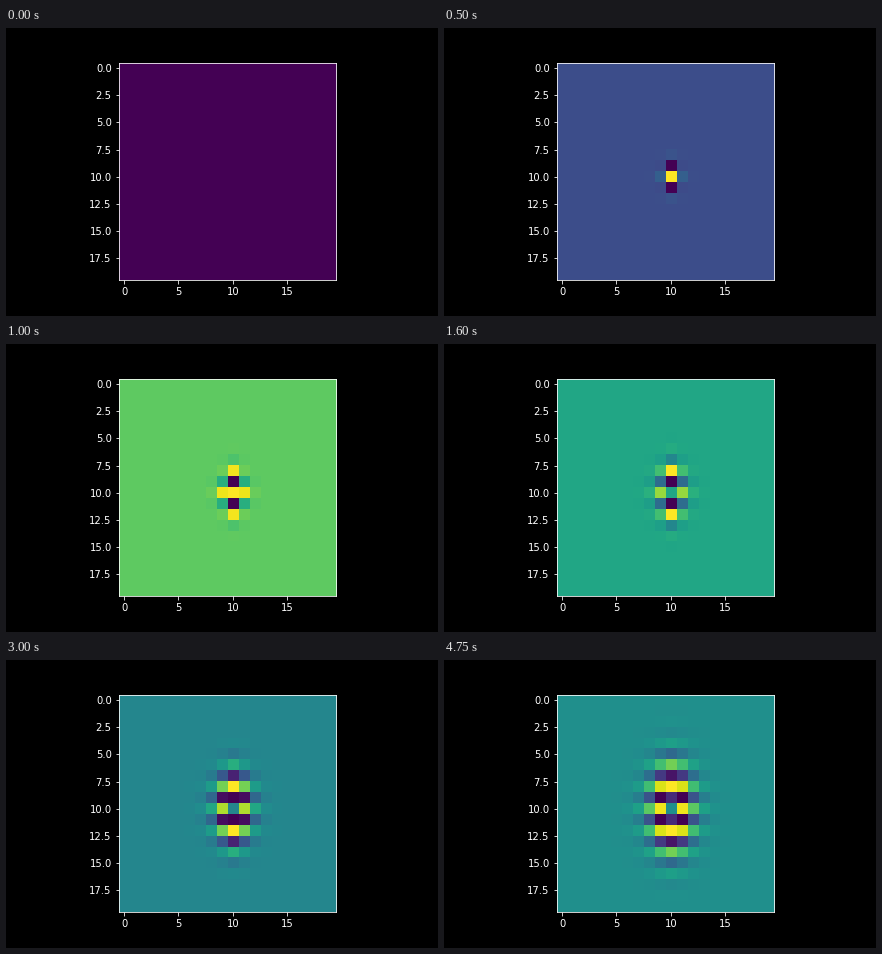
Write a matplotlib script that moves like this. It is 432 px wide and 288 px high and loops after 5000 ms.

```python
import numpy as np
import matplotlib.pyplot as plt
from matplotlib.animation import FuncAnimation

SIZE = 20
MID = 10
FRAMES = 100
STEP = 0.1
ACROSS = 0.004   # coupling along rows
DOWN = -0.015    # coupling along columns, unstable by its sign


def second_diff(u, axis):
    return np.roll(u, 1, axis) - 2 * u + np.roll(u, -1, axis)


def clamp(u, n):
    """Hold the edges at zero and drive the middle cell."""
    u[[0, -1], :] = 0
    u[:, [0, -1]] = 0
    u[MID, MID] = np.sin(STEP * n)
    return u


def simulate():
    old = np.zeros((SIZE, SIZE))
    now = old.copy()
    fields = [now]
    for n in range(1, FRAMES):
        force = ACROSS * second_diff(now, 1) + DOWN * second_diff(now, 0)
        old, now = now, clamp(2 * now - old + force, n)
        fields.append(now)
    return fields


plt.style.use("dark_background")
plt.rcParams["font.family"] = "DejaVu Sans"
plt.rcParams["font.size"] = 10

fields = simulate()
fig, ax = plt.subplots(figsize=(6, 4), dpi=72)
fig.subplots_adjust(left=0.125, right=0.9, bottom=0.125, top=0.88)
image = ax.imshow(fields[0], cmap="viridis", interpolation="nearest")
ax.set_xticks(np.arange(0, SIZE, 5))
ax.set_yticks(np.arange(0, SIZE, 2.5))


def draw(n):
    image.set_data(fields[n])
    image.autoscale()
    return [image]


anim = FuncAnimation(fig, draw, frames=FRAMES, interval=50,
                     repeat=True, repeat_delay=0)
plt.show()
```
